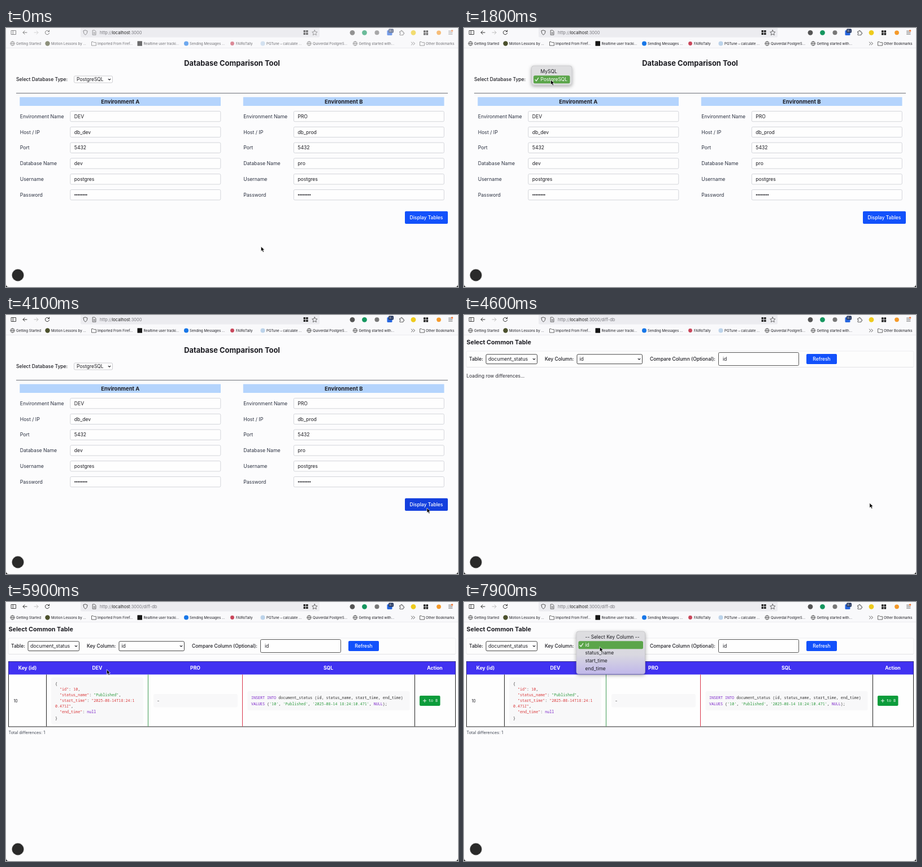
Write an HTML page that moves like this. It is 800 px wide and 459 px high and loops after 8 s.

```html
<!DOCTYPE html>
<html lang="en">
<head>
<meta charset="utf-8">
<title>Database Comparison Tool</title>
<style>
  html, body { margin: 0; width: 100%; height: 100%; overflow: hidden; background: #fcfcfd; }
  svg { display: block; width: 100vw; height: 100vh; font-family: Inter, sans-serif; }
  text { white-space: pre; }
  .mono { font-family: "Noto Sans Mono", monospace; }
</style>
</head>
<body>
<svg id="stage" viewBox="0 0 800 459"></svg>
<script>
const LOOP = 8000;
const INK = '#1c1c22', BLUE = '#1251fb', GREEN = '#5ba54a';

// ---- drawing helpers: each returns SVG markup; text is placed by its vertical centre
const text = (x, y, s, size = 8.6, fill = INK, extra = '') =>
  `<text x="${x}" y="${y + size * .36}" font-size="${size}" fill="${fill}" ${extra}>${s}</text>`;
const bold = (x, y, s, size, fill = INK, anchor = 'middle') =>
  text(x, y, s, size, fill, `font-weight="700" text-anchor="${anchor}"`);
const label = (x, y, s) => text(x, y, s, 8.5, INK, 'font-weight="500"');
const mono = (x, y, s, fill = '#333') => text(x, y, s, 6.69, fill, 'class="mono"');
const rect = (x, y, w, h, fill, r = 0, extra = '') =>
  `<rect x="${x}" y="${y}" width="${w}" height="${h}" rx="${r}" fill="${fill}" ${extra}/>`;
const box = (x, y, w, h, stroke, r = 2) =>
  rect(x + .5, y + .5, w - 1, h - 1, '#fefefe', r, `stroke="${stroke}" stroke-width=".9"`);
const dot = (x, y, r, fill) => `<circle cx="${x}" cy="${y}" r="${r}" fill="${fill}"/>`;
const line = (d, stroke = '#333', width = 1) =>
  `<path d="${d}" fill="none" stroke="${stroke}" stroke-width="${width}" stroke-linecap="round" stroke-linejoin="round"/>`;
const group = (id, body) => `<g id="${id}">${body}</g>`;
const chevron = (x, y) => line(`M${x - 1.8} ${y - 1}l1.8 1.9 1.8-1.9`, INK, 1.1);
const check = (x, y) => line(`M${x} ${y + .4}l2 2.3 3.6-5.4`, '#fff', 1.2);
const button = (x, y, w, h, s, id = '') =>
  rect(x, y, w, h, BLUE, 2, id && `id="${id}"`) +
  text(x + w / 2, y + h / 2, s, 8.5, '#fff', 'text-anchor="middle" font-weight="500"');
const globe = (x, y) => line(
  `M${x - 3.7} ${y}a3.7 3.7 0 1 0 7.4 0a3.7 3.7 0 1 0-7.4 0h7.4M${x} ${y - 3.7}q-3.6 3.7 0 7.4q3.6-3.7 0-7.4`, '#444', .7);
const folder = (x, y) => line(
  `M${x - 4} ${y + 3.2}v-6.2h2.8l1 1.2h4.2v5z`, '#444', .8);
const squares = (x, y) => [0, 1, 2, 3].map(i =>
  rect(x - 4 + i % 2 * 4.5, y - 4 + (i >> 1) * 4.5, 3.6, 3.6, '#222', .5)).join('');

// ---- browser chrome
function toolbar() {
  const bookmark = (x, s) => text(x, 27.5, s, 6.15);
  const icons =
    line('M9.5 4.5h8v7h-8zM12.3 4.5v7', '#333', .9) +
    line('M37 8h-7m3-3l-3 3 3 3', '#333') + line('M50 8h7m-3-3l3 3-3 3', '#bbb') +
    line('M76 6a3.6 3.6 0 1 0 .5 3M76.6 4v2.4h-2.4', '#333') +
    line('M140.5 4l3.6 1.3q0 5-3.6 7q-3.6-2-3.6-7z', '#444', .9) +
    line('M153.6 4h3.4l2 2v6.2h-5.4zM155 8h2.5M155 10h2.5', '#444', .8) +
    squares(530.5, 8) +
    line('M546.3 3.7l1.4 3 3.2.4-2.4 2.2.7 3.2-2.9-1.6-2.9 1.6.7-3.2-2.4-2.2 3.2-.4z', '#444', .8) +
    dot(613, 8.3, 4.4, '#555') + dot(634.5, 8.3, 4.4, '#15965f') + dot(656.5, 8.3, 4, '#777') +
    rect(674.5, 4, 9, 9, '#2766df', 1.5) + rect(677, 1.5, 9, 7, '#23345c', 1.5) +
    text(681.5, 5, '9+', 5, '#fff', 'text-anchor="middle"') +
    line('M697 6.2h2.2q-.9-2 .9-2t.9 2h2v2.2q2-.8 2 1t-2 .9v2.2h-6v-2.4q1.8-.2 1.5-1.3t-1.6-.7z', '#444', .8) +
    dot(721, 8.3, 4.4, '#eecb1c') + squares(743, 8.3) + dot(766, 8.3, 3.9, '#f59a2a') +
    line('M783.5 5.5h6.5M783.5 8.3h6.5M783.5 11h6.5', '#444', .8) + dot(789.5, 5, 1.8, '#ee7a39');
  const marks =
    globe(11.5, 27.5) + bookmark(18, 'Getting Started') +
    dot(73.5, 27.5, 4.2, '#4c512d') + bookmark(80, 'Motion Lessons by ...') +
    folder(155.5, 27.5) + bookmark(162, 'Imported From Firef...') +
    rect(232.5, 23.3, 8.5, 8.5, '#151515', .6) + bookmark(243.5, 'Realtime user tracki...') +
    dot(319, 27.5, 4, '#1877e8') + bookmark(325, 'Sending Messages ...') +
    dot(400.5, 27.5, 3.4, '#c9465a') + bookmark(407, 'FAIRoTally') +
    dot(454.5, 27.5, 4, '#bcd3ea') + bookmark(461, 'PGTune – calculate ...') +
    globe(536.5, 27.5) + bookmark(543, 'Quiverdal PostgreS...') +
    globe(618, 27.5) + bookmark(624.5, 'Getting started with...') +
    line('M717.5 25l2.5 2.5-2.5 2.5M721 25l2.5 2.5-2.5 2.5', '#444', .9) +
    folder(736.5, 27.5) + bookmark(743, 'Other Bookmarks');
  return rect(0, 0, 800, 35.5, '#f9f9fb') + rect(132, -4, 423, 20.5, '#ececf0', 2) +
    rect(0, 35, 800, .7, '#e6e6ea') + group('chrome', icons + marks) +
    `<text x="166" y="11.2" font-size="7.5" fill="#77777d">http://<tspan fill="#222">localhost</tspan>:3000<tspan id="path"></tspan></text>`;
}

// ---- connection form
function environment(x, title, values) {
  const names = ['Environment Name', 'Host / IP', 'Port', 'Database Name', 'Username', 'Password'];
  return rect(x, 122.5, 355.7, 15.5, '#b4d4fd') + bold(x + 178, 130.5, title, 9.5) +
    names.map((name, i) => {
      const y = 156.7 + i * 27.8;
      const value = values[i] !== undefined ? text(x + 96.5, y, values[i], 8.6)
        : Array.from({ length: 8 }, (_, k) => dot(x + 98 + k * 2.9, y, 1.1, INK)).join('');
      return text(x + .4, y, name, 8.7, '#2b3140') + box(x + 89, y - 9.7, 267, 19.3, '#cfd1d6') + value;
    }).join('');
}
const formPage = () =>
  bold(400, 62, 'Database Comparison Tool', 12.9) +
  label(18, 91.3, 'Select Database Type:') +
  box(120, 84.5, 69, 13, '#c8c8cc') + text(125, 91.2, 'PostgreSQL', 8.5) + chevron(183, 91.3) +
  rect(18, 115, 764, 1, '#6c6f76') +
  environment(24.3, 'Environment A', ['DEV', 'db_dev', '5432', 'dev', 'postgres']) +
  environment(419.8, 'Environment B', ['PRO', 'db_prod', '5432', 'pro', 'postgres']) +
  button(706, 324.7, 76, 22.3, 'Display Tables', 'display');

// ---- comparison page
const diffPage = () =>
  bold(4.5, 48, 'Select Common Table', 10.75, INK, 'start') +
  rect(4, 64, 792, 28.5, '#fdfdfd', 2, 'stroke="#ededf0"') + rect(5, 92, 790, 1, '#e2e2e5') +
  label(9, 78.3, 'Table:') + box(38.5, 69.3, 91.5, 17.8, '#333') +
  text(43, 78.2, 'document_status', 8.7) + chevron(124, 78.3) +
  label(143, 78.3, 'Key Column:') + box(199.5, 69.3, 116.5, 17.8, '#333') +
  text(204.5, 78.2, 'id', 8.7) + chevron(310, 78.3) +
  label(329, 78.3, 'Compare Column (Optional):') + box(450, 66, 143, 24, '#444') +
  text(458, 78.2, 'id', 8.7) + button(606, 69, 54, 18, 'Refresh') +
  group('loading', text(4.5, 108, 'Loading row differences...', 8.35, '#2b2b33')) +
  group('result', resultTable());

function resultTable() {
  const span = (fill, s) => `<tspan fill="${fill}">${s}</tspan>`;
  const red = s => span('#d9383a', s), green = s => span('#2c9a3e', s), purple = s => span('#7a22c9', s);
  const json = ['{', `  ${red('"id"')}: ${red('10')},`, `  ${red('"status_name"')}: ${green('"Published"')},`,
    `  ${red('"start_time"')}: ${red('"2025-08-14T18:24:1')}`, `${red('0.471Z"')},`,
    `  ${red('"end_time"')}: ${purple('null')}`, '}'];
  const heads = [[38, 'Key (id)'], [161.5, 'DEV'], [335, 'PRO'], [570.5, 'SQL'], [759, 'Action']];
  const edges = [[71, '#222'], [251, '#3f9a55'], [418, '#d8344a'], [723, '#222']];
  return rect(4.5, 105.5, 791, 115.5, '#fefefe', 0, 'stroke="#222"') +
    rect(4.5, 105.5, 791, 23, '#4132f2') +
    heads.map(([x, s]) => bold(x, 117.3, s, 8.6, '#fff')).join('') +
    edges.map(([x, c]) => rect(x, 128.5, 1, 92, c)).join('') +
    rect(80, 133.5, 163, 83, '#f8f8f9', 3) + rect(261, 163, 149, 23.5, '#f8f8f9', 3) +
    rect(427.5, 158, 287, 34, '#f8f8f9', 3) +
    text(13.5, 175, '10', 7) + json.map((s, i) => mono(87, 144.5 + i * 10.1, s)).join('') +
    mono(267.5, 175, '–') +
    mono(434, 170, `${purple('INSERT INTO')} document_status (id, status_name, start_time, end_time)`) +
    mono(434, 180.3, `${purple('VALUES')} (${green("'10'")}, ${green("'Published'")}, ${green("'2025-08-14 18:24:10.471'")}, ${purple('NULL')});`) +
    rect(732, 166, 36.5, 18, '#0c9c3b', 2) + line('M738.3 175h5.4M741 172.3v5.4', '#fff', .9) +
    mono(748, 175, 'to B', '#fff') +
    text(4.5, 231.8, 'Total differences: 1', 7.3, '#454b57');
}

// ---- native select popups
function popup(id, x, y, w, h, items, chosen, textX, firstY, fill = '#dfdfe1') {
  const step = 14;
  return group(id,
    rect(x, y, w, h, fill, 4, 'stroke="#b9b9bd" stroke-width=".6" filter="url(#shadow)"') +
    rect(x + 3.5, firstY + chosen * step - 7, w - 7, 14, GREEN, 2.5) +
    check(textX - 9.5, firstY + chosen * step) +
    items.map((s, i) => text(textX, firstY + i * step, s, 8.5, i === chosen ? '#fff' : INK)).join(''));
}

const $ = id => document.getElementById(id);
$('stage').innerHTML = `<defs>
    <filter id="shadow" x="-20%" y="-30%" width="140%" height="180%">
      <feDropShadow dx="0" dy="2" stdDeviation="3" flood-opacity=".35"/></filter>
    <linearGradient id="glass" x2="0" y2="1"><stop offset="0" stop-color="#dedee0"/>
      <stop offset=".55" stop-color="#d9d8e0"/><stop offset="1" stop-color="#c0b7ea"/></linearGradient>
  </defs>` +
  rect(0, 0, 800, 459, '#fcfcfd') + group('form', formPage()) + group('diff', diffPage()) + toolbar() +
  dot(21, 438, 11.2, '#dcdcdc') + dot(21, 438, 10.4, '#2a2a2a') +
  popup('typeMenu', 119.5, 67, 71.5, 34, ['MySQL', 'PostgreSQL'], 1, 135.5, 77.2) +
  popup('tableMenu', 37.5, 66, 93.5, 21, ['document_status'], 0, 53, 76.3) +
  popup('keyMenu', 199, 52, 121.5, 75.5,
    ['-- Select Key Column --', 'id', 'status_name', 'start_time', 'end_time'], 1, 214.5, 62.2, 'url(#glass)') +
  '<path d="M0 454v5h5q-5 0-5-5zM800 454v5h-5q5 0 5-5z" fill="#111"/>' +
  '<path id="cursor" d="M0 0v8.6l2-1.8 1.5 3.3 1.7-.8-1.5-3.2h2.7z" fill="#000" stroke="#fff" stroke-width=".7"/>';

// ---- timeline: pointer stops as [ms, x, y]
const stops = [
  [0, 451.3, 387.2], [100, 451.3, 387.2], [1000, 153.5, 92], [3000, 153.5, 92],
  [4050, 745, 342], [4500, 745, 342], [5050, 439.3, 243], [5500, 439.3, 243],
  [6100, 88, 77], [6600, 88, 77], [7000, 240.2, 79.5], [LOOP, 240.2, 79.5]
];

function pointer(t) {
  const i = stops.findIndex(s => s[0] > t);
  const [t0, x0, y0] = stops[i - 1], [t1, x1, y1] = stops[i];
  const u = (t - t0) / (t1 - t0), k = u * u * (3 - 2 * u);
  return [x0 + (x1 - x0) * k, y0 + (y1 - y0) * k];
}

const show = (id, on) => $(id).setAttribute('display', on ? 'inline' : 'none');

function draw(now) {
  const t = now % LOOP;
  const [x, y] = pointer(t);
  const onDiff = t >= 4500, loaded = t >= 5400;
  $('chrome').setAttribute('opacity', t < 100 ? .62 : 1);
  $('path').textContent = onDiff ? '/diff-db' : '';
  show('form', !onDiff);
  show('diff', onDiff);
  show('loading', !loaded);
  show('result', loaded);
  show('typeMenu', t >= 1200 && t < 2400);
  show('tableMenu', t >= 6200 && t < 7200);
  show('keyMenu', t >= 7500);
  $('display').setAttribute('fill', x > 706 && y > 324.7 && y < 347 ? '#1440de' : BLUE);
  $('cursor').setAttribute('transform', `translate(${x} ${y})`);
  requestAnimationFrame(() => draw(performance.now()));
}
draw(0);
</script>
</body>
</html>
```
